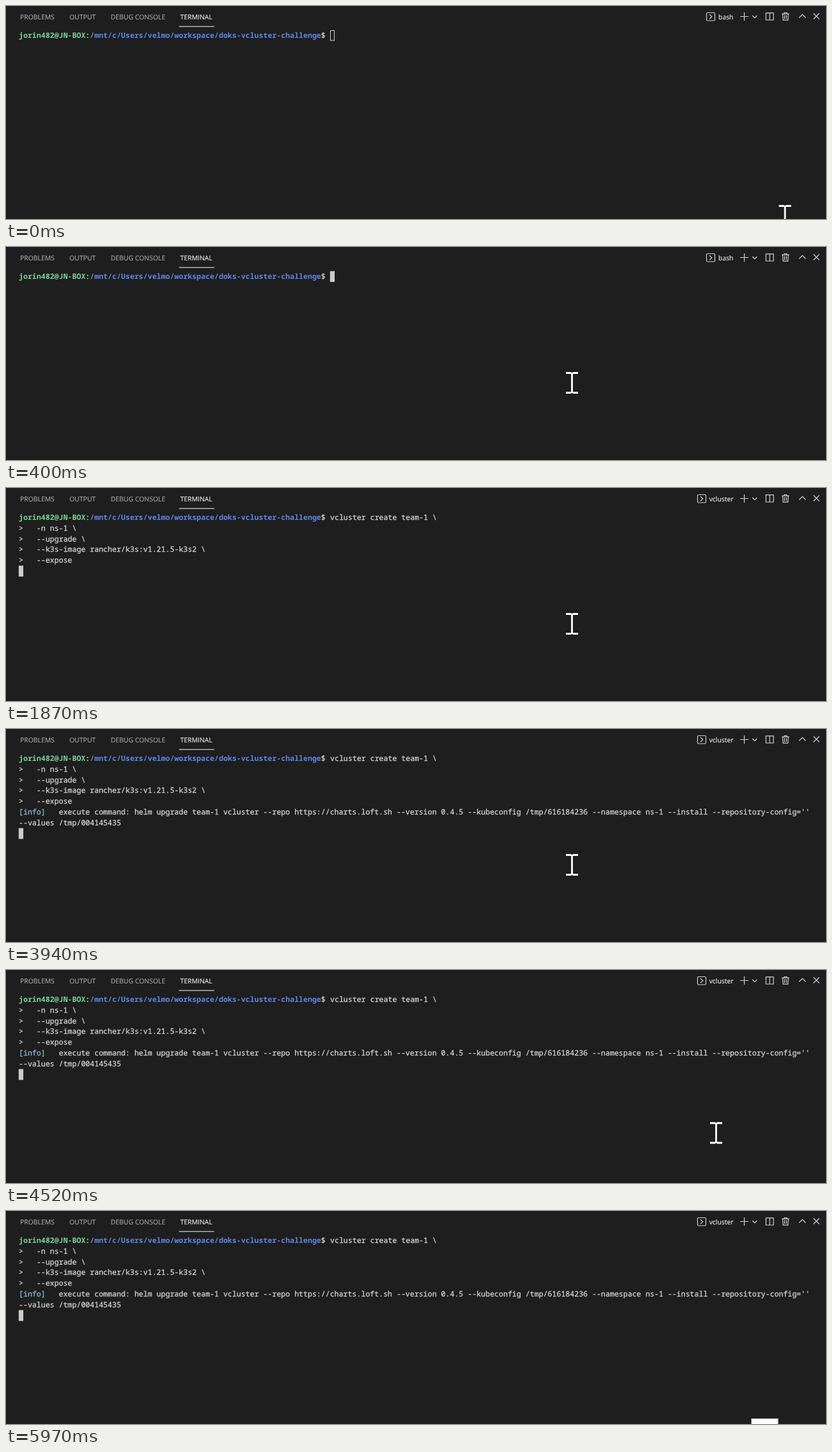
An HTML page that plays this animation: 1280 by 334 pixels, repeating every 8000 ms.

```html
<!DOCTYPE html>
<html lang="en">
<head>
<meta charset="utf-8">
<title>Terminal session</title>
<style>
  html, body { margin: 0; width: 100%; height: 100%; overflow: hidden; background: #1e1e1e; }
  svg { display: block; }
  text { white-space: pre; text-rendering: geometricPrecision; }
  .ui { font: 10.4px "Open Sans", "Noto Sans", sans-serif; fill: #a6a6a6; stroke: #a6a6a6; stroke-width: .15; }
  .ui .active { fill: #ececec; stroke: #ececec; }
  .term { font: 11.572px "Noto Sans Mono", "DejaVu Sans Mono", monospace; fill: #d2d2d2; stroke: #d2d2d2; stroke-width: .3; }
  .user, .path { font-weight: 700; stroke: none; }
  .user { fill: #7bd394; }
  .path { fill: #5c87e6; }
  .info { fill: #86bdd2; stroke: #86bdd2; }
  .icons { fill: none; stroke: #d0d0d0; stroke-width: 1.2; }
</style>
</head>
<body>
<svg width="1280" height="334" viewBox="0 0 1280 334">
  <rect width="1280" height="334" fill="#1e1e1e"/>
  <g class="ui">
    <text x="22" y="20.7">PROBLEMS</text>
    <text x="99" y="20.7">OUTPUT</text>
    <text x="163.5" y="20.7">DEBUG CONSOLE</text>
    <text x="272" y="20.7" class="active">TERMINAL</text>
    <text id="shell" x="1135.5" y="20.7" text-anchor="end" class="active"></text>
  </g>
  <rect x="270" y="31.6" width="55" height="1.1" fill="#e7e7e7"/>
  <g class="icons">
    <g id="shellIcon">
      <rect x=".5" y="10.5" width="13" height="12.5" rx="1.5"/>
      <path d="M5 13.3 8.8 16.8 5 20.3"/>
    </g>
    <path d="M1146 16.5H1159M1152.5 10V23"/>
    <path d="M1165 15 1168.7 18.7 1172.4 15"/>
    <path d="M1186.3 10.8H1198V22H1186.3ZM1192.2 10.8V22"/>
    <path d="M1211 12.3H1222.6M1214.8 12.3V10.5H1218.8V12.3M1212.4 12.3 1213 22.2H1220.6L1221.2 12.3M1215.4 14.3V20.3M1218.2 14.3V20.3"/>
    <path d="M1238 18.5 1243.2 13.3 1248.4 18.5"/>
    <path d="M1260.5 11.5 1269.5 20.5M1269.5 11.5 1260.5 20.5"/>
  </g>
  <g id="term" class="term"></g>
  <rect id="caret"/>
  <path id="mouse" fill="#ffffff" d="M-9.5-17H-1.5L0-15.5 1.5-17H9.5V-14H1.4V14H9.5V17H1.5L0 15.5-1.5 17H-9.5V14H-1.4V-14H-9.5Z"/>
  <circle id="click" cx="884" cy="214" r="30" fill="#ffff00" opacity=".48"/>
  <rect id="tooltip" x="1163.5" y="325.5" width="41.7" height="20" fill="#ffffff" stroke="#8a8a8a"/>
</svg>
<script>
const LOOP = 8000, LEFT = 20, TOP = 38, ROW = 16.8, CHAR = 6.943;
const el = id => document.getElementById(id);
const set = (node, attrs) => {
  for (const name in attrs) node.setAttribute(name, attrs[name]);
};

// Each line is the time it appears, then its [text, class] runs.
const lines = [
  [0, ["jorin482@JN-BOX", "user"], [":"], ["/mnt/c/Users/velmo/workspace/doks-vcluster-challenge", "path"], ["$ "]],
  [730, [">   -n ns-1 \\"]],
  [730, [">   --upgrade \\"]],
  [730, [">   --k3s-image rancher/k3s:v1.21.5-k3s2 \\"]],
  [730, ["> "]],
  [3940, ["[info]", "info"], ["   execute command: helm upgrade team-1 vcluster --repo https://charts.loft.sh --version 0.4.5 --kubeconfig /tmp/616184236 --namespace ns-1 --install --repository-config=''"]],
  [3940, ["--values /tmp/004145435"]]
];
// Text added to a line later: [time, row, column, text].
const additions = [
  [730, 0, 70, "vcluster create team-1 \\"],
  [790, 4, 4, "--expose"]
];
// Text cursor positions: [time, row, column].
const carets = [[0, 0, 70], [730, 4, 2], [790, 4, 12], [1720, 5, 0], [3940, 7, 0]];
// Pointer moves in discrete steps: [first step, last step, step count, x, y].
const moves = [
  [70, 280, 4, 887.5, 215.5],
  [340, 400, 2, 883.5, 213],
  [4000, 4330, 6, 1107.5, 255.5],
  [4520, 4520, 1, 1108.5, 255.5],
  [4930, 5370, 7, 1159.5, 353]
];

const timed = [];
function addText(time, row, column, runs) {
  const text = document.createElementNS("http://www.w3.org/2000/svg", "text");
  set(text, { x: LEFT + column * CHAR, y: Math.round(TOP + 12 + row * ROW) });
  for (const [content, style] of runs) {
    const span = document.createElementNS("http://www.w3.org/2000/svg", "tspan");
    span.textContent = content;
    if (style) span.setAttribute("class", style);
    text.append(span);
  }
  el("term").append(text);
  timed.push([time, text]);
}
lines.forEach(([time, ...runs], row) => addText(time, row, 0, runs));
additions.forEach(([time, row, column, content]) => addText(time, row, column, [[content]]));

const show = (node, visible) => set(node, { visibility: visible ? "visible" : "hidden" });
const stepsDone = (t, first, last, count) =>
  t < first ? 0 : Math.min(count, 1 + Math.floor((t - first) / (last - first || 1) * (count - 1) + 1e-6));
const smooth = p => p * p * (3 - 2 * p);

function pointer(t) {
  let x = 1216, y = 329;
  for (const [first, last, count, endX, endY] of moves) {
    const p = smooth(stepsDone(t, first, last, count) / count);
    x += (endX - x) * p;
    y += (endY - y) * p;
  }
  return `translate(${x} ${y})`;
}

function draw(t) {
  for (const [time, node] of timed) show(node, t >= time);

  const [, row, column] = carets.filter(c => t >= c[0]).pop();
  const x = LEFT + column * CHAR, y = TOP + row * ROW;
  set(el("caret"), t < 280
    ? { x: x + .5, y: y + .5, width: 6, height: 15.6, fill: "none", stroke: "#cccccc" }
    : { x: x - .2, y: y - .2, width: 7.2, height: 17, fill: "#cccccc", stroke: "none" });

  const running = t >= 1870;
  el("shell").textContent = running ? "vcluster" : "bash";
  set(el("shellIcon"), { transform: `translate(${running ? 1079 : 1093} 0)` });

  set(el("mouse"), { transform: pointer(t) });
  show(el("click"), t >= 280 && t < 400);
  set(el("tooltip"), { opacity: stepsDone(t, 5840, 5970, 3) / 3 });
}

function tick(now) {
  draw(now % LOOP);
  requestAnimationFrame(tick);
}
draw(0);
requestAnimationFrame(tick);
</script>
</body>
</html>
```
